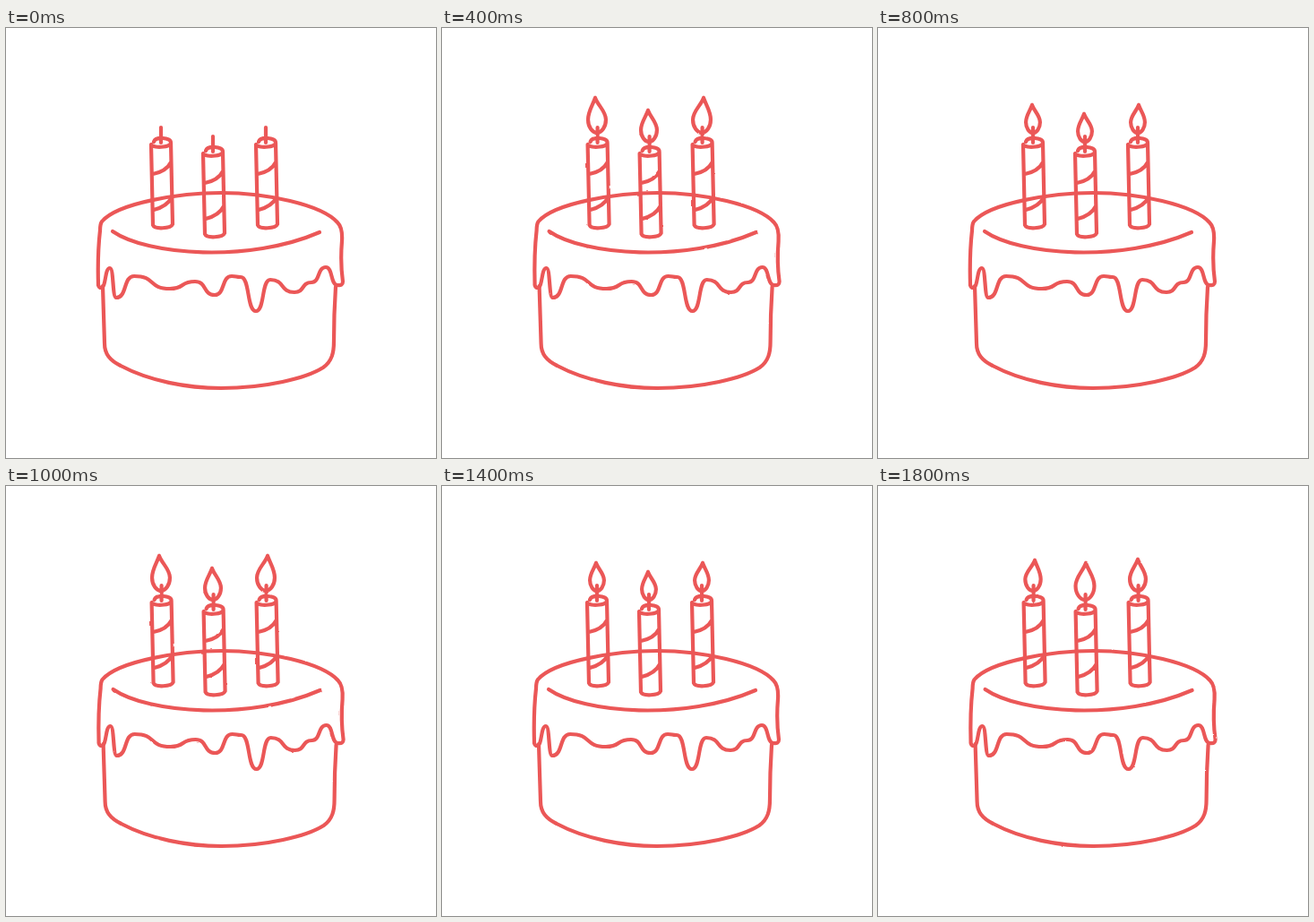
These frames come from a looping animation (480 px wide and 480 px high, 2 s). An HTML page:

```html
<!DOCTYPE html>
<html lang="en">
<head>
<meta charset="utf-8">
<title>Birthday cake</title>
<style>
  html, body { margin: 0; width: 100%; height: 100%; overflow: hidden; background: #fff; }
  svg { display: block; width: 100vw; height: 100vh; }
  .pose { fill: none; stroke: #eb5757; stroke-width: 4.2; stroke-linecap: round; stroke-linejoin: round; }
</style>
</head>
<body>
<svg id="stage" viewBox="0 0 480 480"></svg>
<script>
const STEP = 200, STEPS = 10;

// Each flame: height and sideways lean of the tip
const poses = [
  { dx: 0, freq: 0.08, rough: 1.2, flames: [[31, -1], [31, -1], [31, 1]] },
  { dx: 0.6, freq: 0.12, rough: 2, flames: [[39, -2], [35, -1], [39, 2]] },
  { dx: 0.6, freq: 0.25, rough: 1.8, flames: [[34, 2], [41, 1], [35, 0]] }
];
const candles = [[0, 0], [58, 10], [117, 0]];

// Alternating crests and hollows of the icing edge, right to left
const drips = [
  [370, 287], [357, 267], [341, 284], [322, 295], [295, 281], [279, 316], [262, 278], [252, 277],
  [233, 298], [211, 283], [183, 291], [143, 277], [123, 301], [116, 268], [106, 290]
];

// Wave through turning points, level at each of them
function wave(pts, pull = 0.62) {
  return pts.slice(1).map(([x, y], i) => {
    const [px, py] = pts[i], w = (x - px) * pull;
    return `C${px + w} ${py} ${x - w} ${y} ${x} ${y}`;
  }).join("");
}

const path = d => `<path d="${d}"/>`;

const cake = [
  "M103 287Q102 252 105 226Q105 219 107 216C125 195 195 184 240 184C290 184 352 197 370 217" +
    "Q376 223 375 238Q373 262 376 283Q376 288 370 287" + wave(drips) + "Q104 290 103 287",
  "M119 227C158 254 272 262 350 228",
  "M108 288Q109 320 110 352C110 364 116 371 128 377C160 394 202 402 240 402" +
    "C290 402 335 391 354 379C364 372 366 362 366 350Q366 320 368 289"
].map(path).join("");

const candle = ([x, y]) => `<g transform="translate(${x} ${y})">` + path(
  "M173 111V128" +
  "M165 127C167 121 184 122 184 128C184 134 163 134 162 130" +
  "L164 220C166 225 184 224 186 219L184 128" +
  "M164 163Q179 160 184 150" +
  "M165 203Q180 199 185 189") + "</g>";

function flame([h, lean], i) {
  const x = 173 + candles[i][0], y = 117 + candles[i][1];
  const top = y - h, tip = x + lean, r = h * 0.255, wide = top + h * 0.62;
  const side = w => `M${tip} ${top}C${tip + w * 0.3} ${top + h * 0.22} ${x + w} ${top + h * 0.38} ${x + w} ${wide}` +
    `C${x + w} ${wide + h * 0.22} ${x + w / 2} ${y} ${x} ${y}`;
  return path(side(r) + side(-r));
}

const drawPose = (p, i) => `
  <filter id="rough${i}" filterUnits="userSpaceOnUse" x="0" y="0" width="480" height="480"
      color-interpolation-filters="sRGB">
    <feTurbulence type="fractalNoise" baseFrequency="${p.freq}" seed="${i + 3}"/>
    <feDisplacementMap in="SourceGraphic" scale="${p.rough}" xChannelSelector="R" yChannelSelector="G"/>
  </filter>
  <g class="pose" filter="url(#rough${i})">
    <g transform="translate(${p.dx} 0)">${cake + candles.map(candle).join("")}</g>
    <g class="flames">${p.flames.map(flame).join("")}</g>
  </g>`;

const stage = document.getElementById("stage");
stage.innerHTML = poses.map(drawPose).join("");
const groups = [...stage.querySelectorAll(".pose")];
const firstFlames = groups[0].querySelector(".flames");

// The loop opens unlit, then cycles through the three poses
let shown = -1;
function show(step) {
  if (step === shown) return;
  shown = step;
  const pose = step ? (step - 1) % poses.length : 0;
  groups.forEach((g, i) => { g.style.display = i === pose ? "" : "none"; });
  firstFlames.style.display = step ? "" : "none";
}

const start = performance.now();
function tick(now) {
  show(Math.floor(Math.max(0, now - start) / STEP) % STEPS);
  requestAnimationFrame(tick);
}
show(0);
requestAnimationFrame(tick);
</script>
</body>
</html>
```
